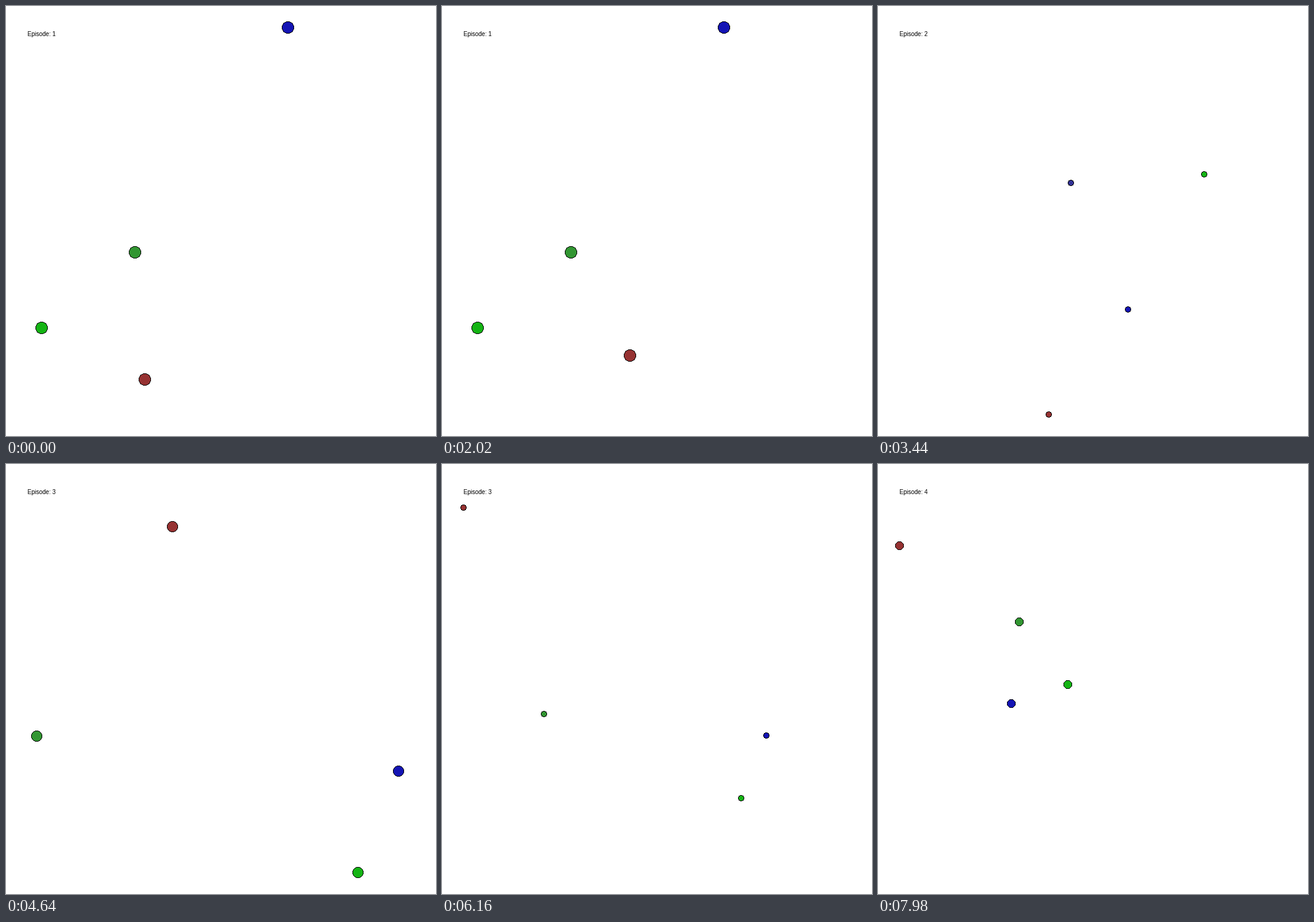
Write a matplotlib script that moves like this. It is 700 px wide and 700 px high and loops after 8000 ms.

```python
import numpy as np
import matplotlib.pyplot as plt
from matplotlib.animation import FuncAnimation

SIZE, MARGIN = 700, 35
HALF = SIZE // 2
REACH = HALF - MARGIN
TICK, LOOP = 20, 8000
FIRST, STEP, STEPS = 20, 100, 23
EPISODE = FIRST + STEP * STEPS

RED, GREEN, BLUE = (150, 50, 50), (50, 150, 50), (50, 50, 150)
LIME, NAVY = (20, 180, 20), (20, 20, 180)


def glide(s, tau):
    """Push off from rest, then slow down under drag; runs from 0 to 1."""
    return 1 - (1 + s / tau) * np.exp(-s / tau)


# Paths of the red dot, measured from the centre of the stage.
def swing(s):
    return (-61 - 63 * np.cos(2 * np.pi * s / 12.3),
            258 - 1.7 * s - 4 * np.sin(np.pi * s / 9))


def arc(s):
    return -124.6 - 0.849 * (s - 13.3) ** 2, 192 + 602 * glide(s, 6)


def corner(s):
    return -79 - 447 * glide(s, 3), -248 - 212 * glide(s, 3)


def leftward(s):
    return 25 - 635 * glide(s, 4), -315 - 1.3 * glide(s, 4)


# Dot radius, path, first dot's colour, and the still dots (first, lime, navy).
EPISODES = [
    (10.4, swing, GREEN, [(-140, 51), (-292, 174), (109, -315)]),
    (9.3, arc, BLUE, [(-63, -108.4), (315, -133.4), (99, 252)]),
    (9.6, corner, GREEN, [(-300, 93), (223, 315), (289, 150)]),
    (10.4, leftward, GREEN, [(-175, -135), (-60, 12.4), (-193, 58.6)]),
]


def locate(frame):
    """Episode index and step for a tick."""
    episode, t = divmod(frame * TICK, EPISODE)
    return episode, 0 if t < FIRST else 1 + (t - FIRST) // STEP


def stamp(canvas, center, radius, color):
    """Hard-edged disc with a one-pixel black rim."""
    x, y = np.round(HALF + center).astype(int)
    axis = np.arange(-radius - 1, radius + 1) + 0.5
    disc = np.hypot(*np.meshgrid(axis, axis)) < radius
    inner = disc.copy()
    for shift in (-1, 1):
        for side in (0, 1):
            inner &= np.roll(disc, shift, side)
    box = canvas[y - radius - 1:y + radius + 1, x - radius - 1:x + radius + 1]
    box[disc, :3] = 0
    box[inner, :3] = color


fig = plt.figure(figsize=(7, 7), dpi=100, facecolor="white")
ax = fig.add_axes([0, 0, 1, 1])
ax.axis("off")
canvas = np.full((SIZE, SIZE, 4), 255, np.uint8)
stage = ax.imshow(canvas, extent=(0, SIZE, SIZE, 0), interpolation="nearest",
                  aspect="auto")
label = ax.text(35, 49, "", family="Liberation Sans", size=7, color="black",
                ha="left", va="baseline")


def draw(frame):
    episode, step = locate(frame)
    radius, path, first, still = EPISODES[episode]
    points = np.array(still + [path(step)])

    # The camera zooms so the farthest dot sits on the margin.
    zoom = REACH / np.abs(points).max()
    canvas[:] = 255
    for point, color in zip(points, (first, LIME, NAVY, RED)):
        stamp(canvas, point * zoom, int(radius * zoom), color)
    stage.set_data(canvas)
    label.set_text(f"Episode: {episode + 1}")
    return stage, label


anim = FuncAnimation(fig, draw, frames=LOOP // TICK, interval=TICK,
                     repeat=True, repeat_delay=0, blit=False)
plt.show()
```
